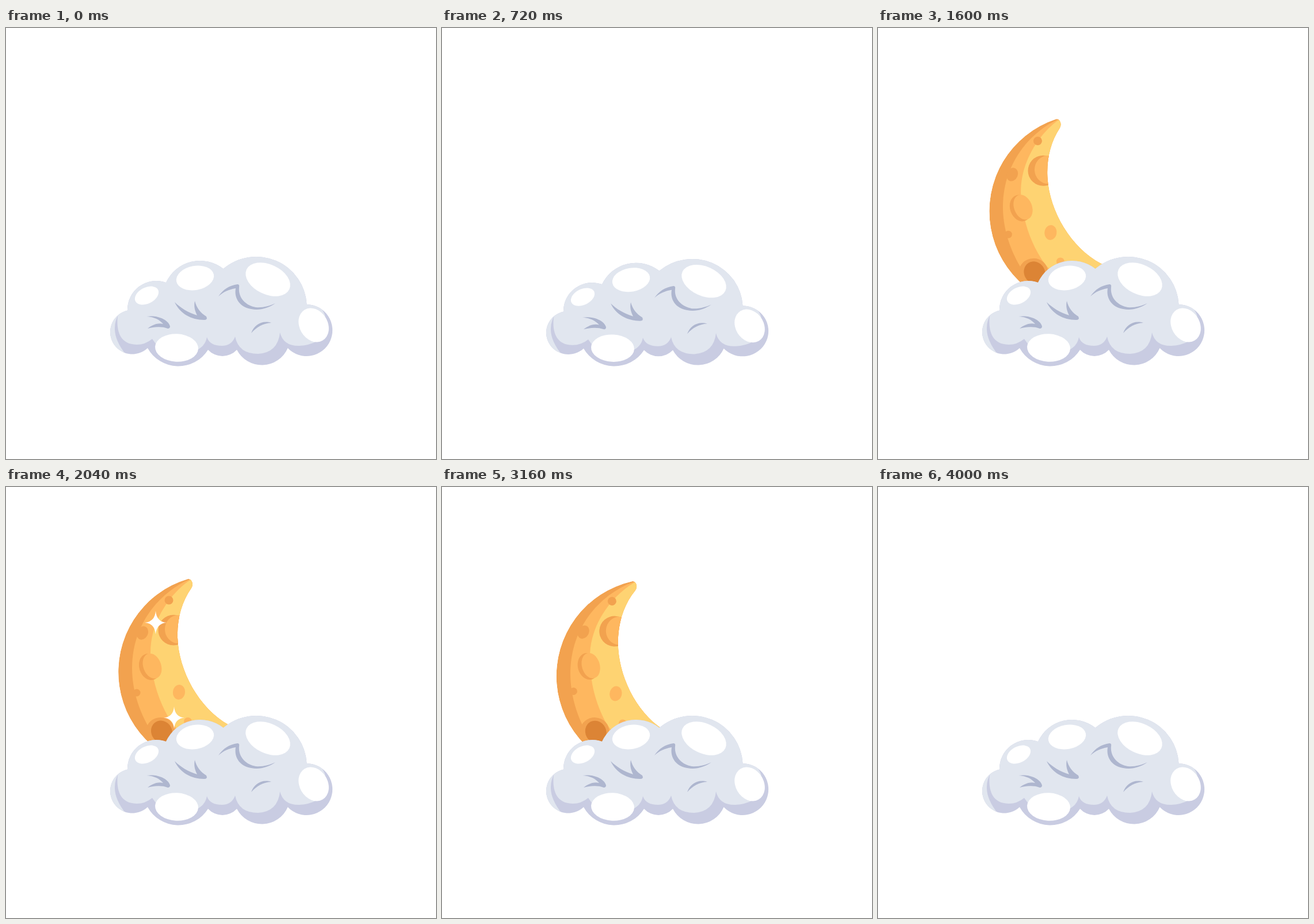
An HTML page for the animation above (4.12 s loop, 747 by 750 pixels).

```html
<!DOCTYPE html>
<html lang="en">
<head>
<meta charset="utf-8">
<title>Moon and cloud</title>
<style>
  html, body { margin: 0; width: 100%; height: 100%; overflow: hidden; background: #fff; }
  svg { display: block; width: 100%; height: 100%; }
  .shade { fill: #c9cce2; }
  .light { fill: #e1e6ef; }
  .crease { fill: #aeb6cf; }
  .white { fill: #fff; }
  .dark { fill: #f2a24f; }
  .mid { fill: #feb75f; }
  .pale { fill: #fed372; }
  .deep { fill: #dc8435; }
</style>
</head>
<body>
<svg viewBox="0 0 747 750">
  <defs>
    <path id="moonShape" d="M316 160 A169 169 0 0 0 364 491 Q420 480 440 434 Q413 428 387 414 C335 385 300 320 298 262 C297 231 305 200 322 176 Q325 171 323.500 166 Q321 159 316 160Z"/>
    <path id="cloudShape" d="M211 491.500 A50 50 0 0 1 278 443 A65 65 0 0 1 377.500 419 A88 88 0 0 1 522.500 481 A45 45 0 1 1 489.500 557 A49 49 0 0 1 401 560 A34 34 0 0 1 351 560 A61 61 0 0 1 246 557 A38.500 38.500 0 1 1 211 491.500Z"/>
    <path id="starShape" d="M0 -1 Q.07 -.07 .92 0 Q.07 .07 0 1 Q-.07 .07 -.92 0 Q-.07 -.07 0 -1Z"/>
    <clipPath id="moonClip"><use href="#moonShape"/></clipPath>
    <clipPath id="cloudClip"><use href="#cloudShape"/></clipPath>
    <clipPath id="horizon"><rect width="747" height="480"/></clipPath>
  </defs>

  <g clip-path="url(#horizon)">
    <g id="moon">
      <g clip-path="url(#moonClip)">
        <use href="#moonShape" class="dark"/>
        <path class="mid" d="M318 161 C265 185 219 240 219 315 C219 360 236 405 264 443 L330 500 H500 V150Z"/>
        <path class="pale" d="M321 161 C285 185 250 235 251 290 C253 335 265 375 289 412 L350 480 H500 V150Z"/>
        <circle class="dark" cx="283" cy="197" r="7.500"/>
        <circle class="dark" cx="291" cy="249" r="26.500"/>
        <ellipse class="mid" cx="299" cy="247.500" rx="23" ry="24.500"/>
        <ellipse class="dark" cx="237" cy="254" rx="9.500" ry="12" transform="rotate(25 237 254)"/>
        <ellipse class="dark" cx="249.500" cy="313" rx="18" ry="23.500" transform="rotate(-18 249.500 313)"/>
        <ellipse class="mid" cx="254" cy="311.500" rx="15.500" ry="22.500" transform="rotate(-20 254 311.500)"/>
        <circle class="dark" cx="227" cy="358" r="6.500"/>
        <ellipse class="mid" cx="300.500" cy="357" rx="10.500" ry="13" transform="rotate(8 300.500 357)"/>
        <ellipse class="dark" cx="268.500" cy="424" rx="25" ry="23"/>
        <ellipse class="deep" cx="270.500" cy="426" rx="18" ry="20" transform="rotate(-30 270.500 426)"/>
        <circle class="mid" cx="316" cy="408" r="7"/>
      </g>
      <use id="upperStar" href="#starShape" class="white"/>
      <use id="lowerStar" href="#starShape" class="white"/>
    </g>
  </g>

  <g id="cloud">
    <use href="#cloudShape" class="shade"/>
    <g clip-path="url(#cloudClip)" class="light">
      <path d="M195 497 C193 505 187 551 227 551 Q242 551 254 541 L262 552 L328 562 Q346 555 349 538 Q354 553 375 553 Q392 553 398 537 Q404 567 438 567 Q472 565 476 530 Q482 554 510 553 Q527 552 540 545 L555 520 Q558 502 549 490 V380 H195Z"/>
      <path d="M196 497 Q177 530 209 569 H170 V490Z"/>
    </g>
    <g class="white">
      <ellipse cx="244.500" cy="465.500" rx="22" ry="14" transform="rotate(-27 244.500 465.500)"/>
      <ellipse cx="328.500" cy="435" rx="33" ry="21" transform="rotate(-10 328.500 435)"/>
      <ellipse cx="455" cy="437.500" rx="41" ry="26" transform="rotate(25 455 437.500)"/>
      <ellipse cx="296.500" cy="556.500" rx="37.500" ry="24.200" transform="rotate(3 296.500 556.500)"/>
      <ellipse cx="534.500" cy="517" rx="31" ry="24.500" transform="rotate(60 534.500 517)"/>
    </g>
    <g class="crease">
      <path d="M244 502 C264 499 282 508 285 519 Q285 523 281 523 C270 519 258 520 246 523 C256 515 265 513 273 515 C266 507 257 503 244 502Z"/>
      <path d="M293 477 C303 487 316 495 332 500 C328 492 326 484 328 475 C331 487 338 496 348 502 Q351 508 344 508 C322 508 302 497 293 477Z"/>
      <path d="M369 467 C377 455 388 448 402 446 Q406 446 405 451 C403 470 417 483 434 486 C446 487 457 484 468 479 C455 488 440 492 426 489 C406 486 396 470 399 453 C387 455 378 459 369 467Z"/>
      <path d="M426 531 C431 517 444 508 461 513 C446 514 436 520 426 531Z"/>
    </g>
  </g>
</svg>
<script>
  const LOOP = 4120, STEP = 40;
  const $ = id => document.getElementById(id);
  const moon = $('moon'), cloud = $('cloud');

  // Each key is [time, value]; values ease in and out between keys.
  const tracks = {
    stretch: [[0, 1], [200, 1.055], [400, 1]],
    squash: [[0, 1], [200, 0.965], [400, 1], [600, 0.94], [800, 1]],
    sink: [[800, 272], [1440, 0], [3440, 0], [4080, 272]],
    sway: [[1440, 0], [1840, -5], [2240, 5], [2640, -5], [3040, 5], [3440, 0]],
    upperStar: [[1720, 0], [2120, 23], [2520, 0]],
    lowerStar: [[1640, 0], [2040, 19.5], [2440, 0]]
  };

  function valueAt(keys, t) {
    if (t <= keys[0][0]) return keys[0][1];
    for (let i = 1; i < keys.length; i++) {
      const [t0, v0] = keys[i - 1], [t1, v1] = keys[i];
      if (t < t1) {
        const s = (t - t0) / (t1 - t0);
        return v0 + (v1 - v0) * s * s * (3 - 2 * s);
      }
    }
    return keys[keys.length - 1][1];
  }

  function placeStar(id, x, y, t) {
    const size = valueAt(tracks[id], t);
    $(id).setAttribute('visibility', size > 0 ? 'inherit' : 'hidden');
    $(id).setAttribute('transform', `translate(${x} ${y}) scale(${size})`);
  }

  function draw(t) {
    const at = name => valueAt(tracks[name], t);
    const sink = at('sink');
    moon.setAttribute('visibility', sink < 255 ? 'visible' : 'hidden');
    moon.setAttribute('transform', `translate(${sink * 0.168} ${sink}) rotate(${at('sway')} 265 378)`);
    cloud.setAttribute('transform', `translate(373.5 587) scale(${at('stretch')} ${at('squash')}) translate(-373.5 -587)`);
    placeStar('upperStar', 260, 236, t);
    placeStar('lowerStar', 292, 401.5, t);
  }

  const start = performance.now();
  function tick() {
    const t = (performance.now() - start) % LOOP;
    draw(Math.floor(t / STEP) * STEP);
    requestAnimationFrame(tick);
  }
  draw(0);
  requestAnimationFrame(tick);
</script>
</body>
</html>
```
